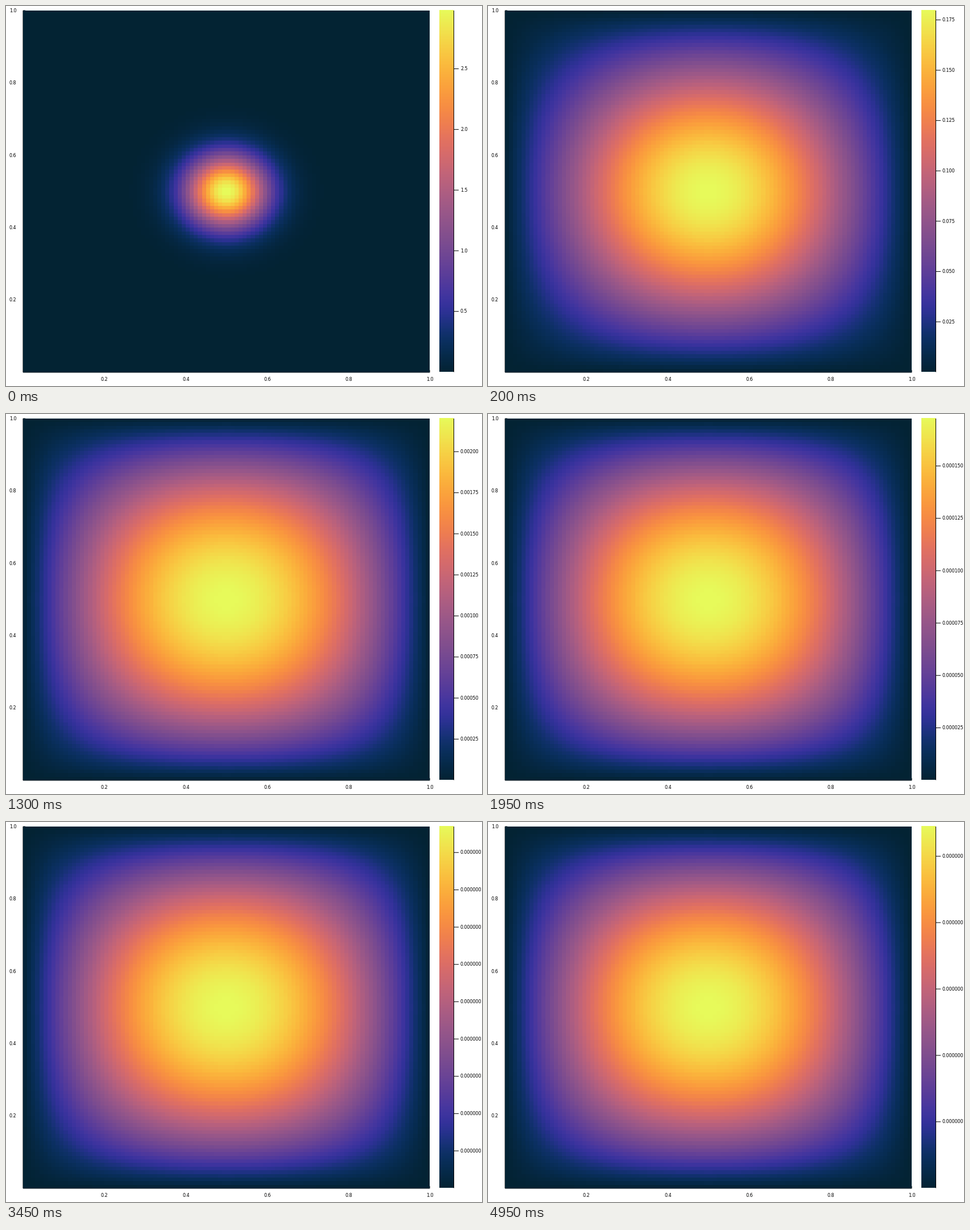
Write a matplotlib script that moves like this. It is 837x669 px and loops after 5000 ms.

```python
import math

import numpy as np
import matplotlib.pyplot as plt
from matplotlib.animation import FuncAnimation
from matplotlib.collections import LineCollection
from matplotlib.colors import ListedColormap

W, H, DPI = 837, 669, 64
FRAMES, INTERVAL = 100, 50
LEFT, RIGHT, TOP, BOTTOM = 30, 745, 8, 645
BAR_LEFT, BAR_RIGHT, BAR_BOTTOM = 762.5, 787.5, 644.5
PX = 72 / DPI  # points per pixel

# Heat equation on the unit square, walls held at zero
CELLS, MODES = 100, 60
PEAK, SHARPNESS = 2.995, 100
DIFFUSION, SUBSTEPS = 0.010118, 5

THERMAL = np.array([
    (3, 35, 51), (13, 48, 100), (53, 50, 155), (93, 62, 153),
    (126, 77, 143), (158, 89, 135), (193, 100, 121), (225, 113, 97),
    (246, 139, 69), (251, 173, 60), (246, 211, 70), (231, 250, 90),
]) / 255


def smooth_colormap(stops, levels=256):
    """Cubic Hermite interpolation through evenly spaced colours."""
    slopes = np.gradient(stops, axis=0)
    pos = np.linspace(0, len(stops) - 1, levels)
    i = np.minimum(pos.astype(int), len(stops) - 2)
    t = (pos - i)[:, None]
    rgb = ((1 + 2 * t) * (1 - t) ** 2 * stops[i]
           + t * (1 - t) ** 2 * slopes[i]
           + t ** 2 * (3 - 2 * t) * stops[i + 1]
           + t ** 2 * (t - 1) * slopes[i + 1])
    return ListedColormap(np.clip(rgb, 0, 1))


centres = (np.arange(CELLS) + 0.5) / CELLS
mode = np.arange(1, MODES + 1)
sines = np.sin(math.pi * np.outer(mode, centres))
bump = np.exp(-SHARPNESS * (centres - 0.5) ** 2)
coef = 2 / CELLS * sines @ bump
start = PEAK * np.outer(coef, coef)
rates = DIFFUSION * math.pi ** 2 * np.add.outer(mode ** 2, mode ** 2)


def heat(frame):
    decay = (1 + rates / SUBSTEPS) ** (-SUBSTEPS * frame)
    return np.maximum(sines.T @ (start * decay) @ sines, 0)


def tick_step(span):
    """Tick distance and the decimals its labels need (six at most)."""
    power = math.floor(math.log10(span))
    lead = span / 10 ** power
    if lead > 5:
        unit, extra = 1, 0
    elif lead > 2.5:
        unit, extra = 0.5, 1
    else:
        unit, extra = 0.25, 2
    return unit * 10.0 ** power, min(max(extra - power, 0), 6)


fig = plt.figure(figsize=(W / DPI, H / DPI), dpi=DPI, facecolor="white")
ax = fig.add_axes([0, 0, 1, 1])
cmap = smooth_colormap(THERMAL)


def label(x, y, text="", ha="center"):
    return ax.text(x, y, text, ha=ha, va="center", color="black",
                   family="DejaVu Sans", size=8 * PX)


def lines(segments, zorder):
    group = LineCollection(segments, colors="black", linewidths=PX,
                           zorder=zorder)
    group.set_snap(False)
    return ax.add_collection(group)


field = ax.imshow(heat(0), cmap=cmap, extent=(LEFT, RIGHT, BOTTOM, TOP),
                  origin="lower", interpolation="nearest", aspect="auto",
                  zorder=2)
ax.imshow(np.linspace(0, 1, 256)[:, None], cmap=cmap,
          extent=(BAR_LEFT, BAR_RIGHT, BAR_BOTTOM, TOP),
          origin="lower", interpolation="nearest", aspect="auto", zorder=2)
ax.set_xlim(0, W)
ax.set_ylim(H, 0)
ax.axis("off")

# Axes and end ticks lie half hidden under the heat map
lines([[(LEFT, TOP), (LEFT, BOTTOM)], [(LEFT, BOTTOM), (RIGHT, BOTTOM)],
       [(LEFT, TOP), (LEFT + 4, TOP)],
       [(RIGHT, BOTTOM), (RIGHT, BOTTOM - 4)]], 1)
lines([[(BAR_RIGHT, TOP), (BAR_RIGHT, BAR_BOTTOM)]], 3)

for v in (0.2, 0.4, 0.6, 0.8, 1.0):
    label(LEFT + v * (RIGHT - LEFT) + 0.3, 657, f"{v:.1f}")
    label(18.3, BOTTOM - v * (BOTTOM - TOP) + 0.2, f"{v:.1f}", "right")

bar_ticks = lines([], 3)
bar_labels = [label(799, 0, ha="left") for _ in range(10)]


def update(frame):
    u = heat(frame)
    low, high = u.min(), u.max()
    field.set_data(u)
    field.set_clim(low, high)

    step, decimals = tick_step(high - low)
    count = int(high / step)
    marks = []
    for i, text in enumerate(bar_labels):
        text.set_visible(i < count)
        if i < count:
            value = (i + 1) * step
            y = BAR_BOTTOM - (value - low) / (high - low) * (BAR_BOTTOM - TOP)
            marks.append([(BAR_RIGHT, y), (BAR_RIGHT + 8.5, y)])
            text.set_y(y + 0.2)
            text.set_text(f"{value:.{decimals}f}")
    bar_ticks.set_segments(marks)
    return [field, bar_ticks, *bar_labels]


anim = FuncAnimation(fig, update, frames=FRAMES, interval=INTERVAL,
                     repeat=True, repeat_delay=0)
plt.show()
```
